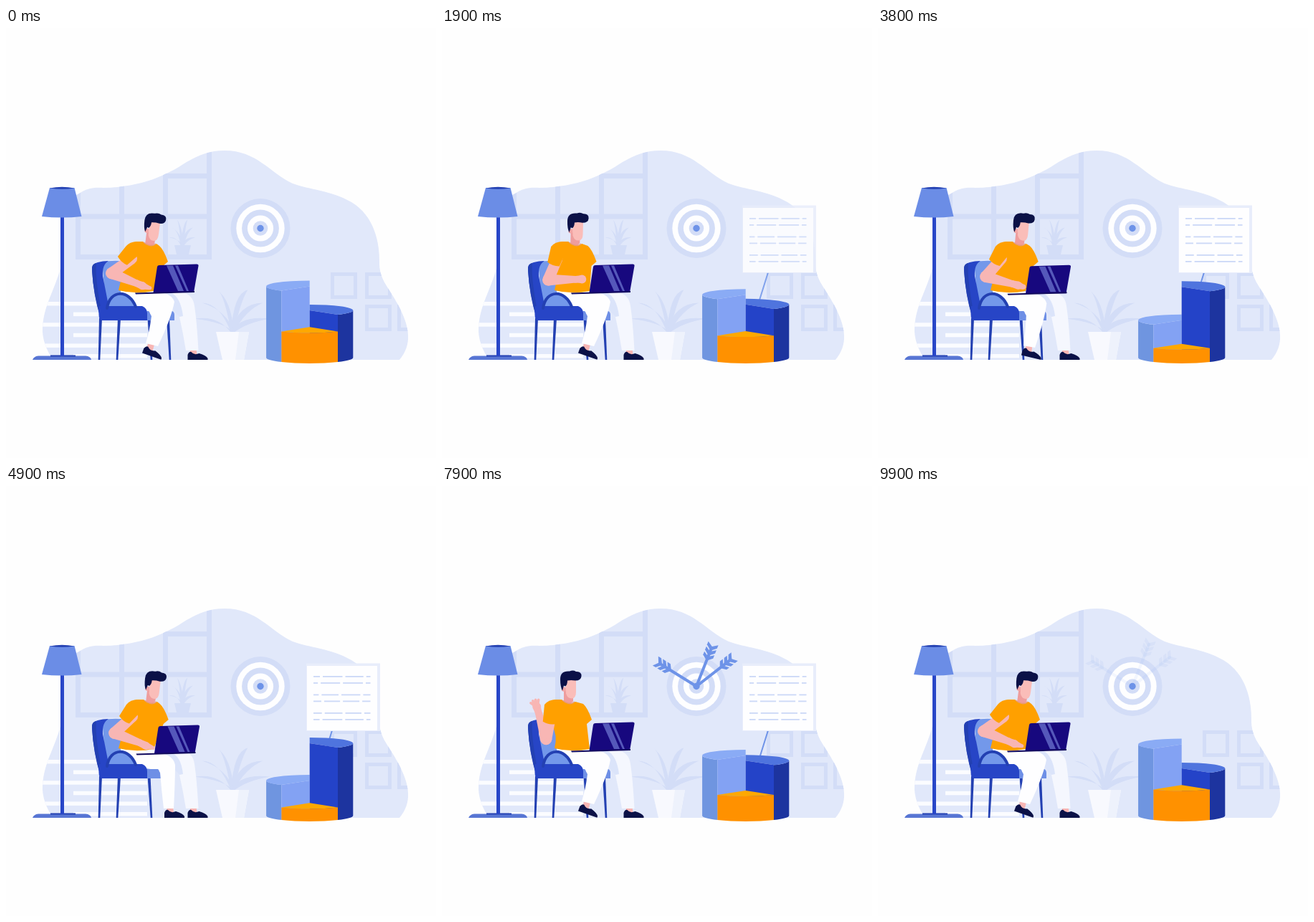
These frames come from a looping animation (600 px wide and 600 px high, 10000 ms). An HTML page with a canvas:

```html
<!DOCTYPE html>
<html lang="en">
<head>
<meta charset="utf-8">
<title>Working at home</title>
<style>
html, body { margin: 0; width: 100%; height: 100%; overflow: hidden; background: #fefefe; }
canvas { display: block; width: 600px; height: 600px; }
</style>
</head>
<body>
<canvas id="stage" width="600" height="600"></canvas>
<script>
const c = document.getElementById('stage').getContext('2d');
const LOOP = 10000;
const PALE = '#d3ddf7', SKY = '#6e93e8', BLUE = '#2745c6', DEEP = '#2340b2';
const NAVY = '#0b1147', SKIN = '#f8b6b4', ORANGE = '#ffa000', WHITE = '#fefeff';

const lerp = (a, b, u) => a + (b - a) * u;
const ramp = (t, a, b) => Math.min(1, Math.max(0, (t - a) / (b - a)));
const ease = (u, n = 2) => u < 0.5 ? Math.pow(2 * u, n) / 2 : 1 - Math.pow(2 - 2 * u, n) / 2;
const polar = ([x, y], deg, r) => [x + r * Math.cos(deg * Math.PI / 180), y + r * Math.sin(deg * Math.PI / 180)];

function shape(d, fill) {
  c.fillStyle = fill;
  c.fill(new Path2D(d));
}
function rect(x, y, w, h, fill) {
  c.fillStyle = fill;
  c.fillRect(x, y, w, h);
}
function disc(x, y, r, fill) {
  c.fillStyle = fill;
  c.beginPath();
  c.arc(x, y, r, 0, 7);
  c.fill();
}
function line(d, width, color, cap = 'butt') {
  c.lineWidth = width;
  c.strokeStyle = color;
  c.lineCap = cap;
  c.stroke(new Path2D(d));
}
function placed(x, y, turn, paint) {
  c.save();
  c.translate(x, y);
  c.rotate(turn);
  paint();
  c.restore();
}
// tapered bar with round ends
function limb([x1, y1], r1, [x2, y2], r2, fill) {
  const a = Math.atan2(y2 - y1, x2 - x1) + Math.PI / 2, s = Math.sin(a), k = Math.cos(a);
  disc(x1, y1, r1, fill);
  disc(x2, y2, r2, fill);
  c.beginPath();
  c.moveTo(x1 + r1 * k, y1 + r1 * s);
  c.lineTo(x2 + r2 * k, y2 + r2 * s);
  c.lineTo(x2 - r2 * k, y2 - r2 * s);
  c.lineTo(x1 - r1 * k, y1 - r1 * s);
  c.fill();
}

// ---- room ----
const blob = new Path2D('M66 463C56 450 50 432 51 418C52 398 58 384 66 364C76 340 82 318 81 290' +
  'C80 258 84 240 102 231C112 224 122 222 136 223C190 222 225 205 252 187C270 177 284 171 305 171' +
  'C350 171 368 202 400 217C424 226 452 226 482 243C514 262 522 300 521 330C522 352 534 362 547 386' +
  'C564 418 567 442 549 463Z');

function leaves(x, y, rx, ry, w) {
  for (const a of [0.4, 0.88, 1.27])
    for (const s of [-1, 1]) {
      const dx = s * rx * Math.sin(a), dy = -ry * Math.cos(a);
      const mx = x + dx * 0.3, my = y + dy * 0.75 - w;
      shape(`M${x - 2} ${y}Q${mx - w} ${my - w} ${x + dx} ${y + dy}Q${mx + w} ${my + w} ${x + 2} ${y}Z`, PALE);
    }
}

function frame(x, y) {
  c.strokeStyle = PALE;
  c.lineWidth = 5;
  c.strokeRect(x + 2.5, y + 2.5, 32, 32);
}

function room() {
  c.save();
  c.clip(blob);
  rect(0, 150, 600, 320, '#e1e8fa');
  for (let i = 0; i < 4; i++) rect(97 + 61 * i, i === 2 ? 203 : 165, 7, i === 2 ? 120 : 158, PALE);
  for (let i = 0; i < 3; i++) rect(i ? 97 : 219, 203 + 56.5 * i, i ? 190 : 68, 7, PALE);
  for (let i = 0; i < 6; i++) {
    const x = i % 2 ? 94 : 40;
    rect(x, 382 + i * 14.6, 197 - x, 5.5, '#fbfcff');
  }
  for (let i = 0; i < 2; i++) {
    frame(453 + 48 * i, 341);
    frame(501 + 45 * i, 386);
  }
  c.restore();

  shape('M235 303H258L255 316H238Z', PALE);
  leaves(246, 304, 19, 40, 2);

  for (let i = 0; i < 5; i++) disc(355, 279.5, 41.5 - 7.8 * i, i % 2 ? WHITE : PALE);
  disc(355, 279.5, 4.7, SKY);

  leaves(316, 425, 55, 65, 5);
  shape('M293 424H339L332 463H302Z', '#f8f9fe');
  shape('M325 424H339L332 463H320Z', '#eef2fc');
}

function lamp() {
  shape('M37 463Q39 458 45 457.5H111Q118 458 119 463Z', '#5876d4');
  rect(62, 456.5, 35, 2, DEEP);
  rect(76, 262, 5, 196, '#2846c8');
  shape('M61 223H95.5L105.5 263Q78 266 50 263Z', '#6b8de6');
  shape('M61 223.5Q78 220 95.5 223.5Q78 226 61 223.5Z', DEEP);
}

// ---- board and arrows ----
function board(alpha) {
  if (alpha <= 0) return;
  c.save();
  c.globalAlpha = alpha;
  line('M455 341L441 386', 2, SKY);
  rect(419, 247.5, 103, 94.5, '#e8edfb');
  rect(420, 251, 98, 90, WHITE);
  for (let i = 0; i < 6; i++) {
    const y = 265 + 25.5 * (i >> 1) + 9 * (i % 2);
    rect(429, y, 79.5, 1.8, '#cbd8f7');
    for (let k = 0; k < 3; k++) rect(438 + 29 * k + 3 * Math.sin(5 * i + k), y - 1, 4, 4, WHITE);
  }
  c.restore();
}

function arrow(dx, dy, shift, alpha) {
  if (alpha <= 0) return;
  const n = Math.hypot(dx, dy);
  c.save();
  c.globalAlpha = alpha;
  placed(355, 279.5, Math.atan2(dy, dx), () => {
    c.translate(shift, 0);
    line(`M0 0H${n - 8}`, 4, SKY, 'round');
    for (let i = 0; i < 3; i++)
      for (const s of [-1, 1]) {
        const d = n - 27 + 7.5 * i;
        shape(`M${d} 0L${d + 6} ${s * 7.5}H${d + 11}L${d + 6} 0Z`, SKY);
      }
  });
  c.restore();
}

function arrows(t) {
  const out = ramp(t, 8700, 10000);
  [[-58, -36], [24, -61], [54, -42]].forEach(([dx, dy], i) => {
    const u = ramp(t, 5600 + i * 270, 6050 + i * 270);
    arrow(dx, dy, 30 * (1 - u) * (1 - u) + 6 * out, u * (1 - out));
  });
}

// ---- pie blocks ----
const CX = 423.7, RX = 60.6, RY = 8, FLOOR = 460;
const FR = 0.865, FL = Math.PI - FR, BACK = Math.PI * 1.5;

function side(y, a, b, fill) {
  c.fillStyle = fill;
  c.beginPath();
  c.ellipse(CX, y, RX, RY, 0, a, b);
  c.ellipse(CX, FLOOR, RX, RY, 0, b, a, true);
  c.fill();
}
function lid(y, a, b, fill) {
  c.fillStyle = fill;
  c.beginPath();
  c.moveTo(CX, y);
  c.ellipse(CX, y, RX, RY, 0, a, b);
  c.fill();
}
function cut(y, a, fill) {
  const x = CX + RX * Math.cos(a), d = RY * Math.sin(a);
  shape(`M${CX} ${y}L${x} ${y + d}V${FLOOR + d}L${CX} ${FLOOR}Z`, fill);
}
function pie(t) {
  const p = ease(1 - Math.abs(t / 5000 - 1), 2.8);
  const left = lerp(360.5, 411, p), dark = lerp(394, 359, p), front = lerp(417.3, 442.3, p);
  side(left, FL, Math.PI, '#6f95e0');
  lid(left, FL, BACK, '#8aabf5');
  cut(left, FL, '#83a2f3');
  side(dark, 0, FR, '#1d349f');
  lid(dark, -Math.PI / 2, FR, '#4f74de');
  cut(dark, FR, '#2443c8');
  side(front, FR, FL, '#ff9100');
  lid(front, FR, FL, '#ffa800');
}

// ---- chair ----
function chairBack() {
  [[132, 130], [158, 155], [199.5, 203], [226, 229]].forEach(([a, b]) =>
    shape(`M${a - 2} 405H${a + 2}L${b + 1.3} 463H${b - 1.3}Z`, DEEP));
  shape('M190 394H229Q235 395 235 400V408H190Z', '#6e8fe6');
  shape('M134 327Q150 323 168 326L186 392H140Z', '#7398ea');
  shape('M120 338Q119 329 128 327Q135 325 143 325Q134 330 135 346L144 392L132 404Q122 372 120 338Z', BLUE);
  shape('M120 338Q119 329 126 328Q124 350 134 400L131 402Q122 372 120 338Z', DEEP);
}
function chairFront(p) {
  const edge = lerp(202, 215, p);
  shape('M141 391C145 364 172 365 181 389Z', '#7398ea');
  shape('M130 388H190Q197 391 197 398V408H133Q128 407 130 388Z', BLUE);
  shape(`M197 395H${edge - 3}Q${edge} 397 ${edge} 408H197Z`, '#6e8fe6');
  line('M141 391C145 364 172 365 181 389', 4, DEEP, 'round');
}

// ---- person ----
// time, neck x, head tilt, upper arm and forearm angles, open palm
const KEYS = [
  [0, 202, 0.13, 132, 22, 0], [1200, 202, 0.13, 127, 21, 0],
  [2200, 184, 0, 105, -6, 0], [3000, 184, 0, 105, -6, 0],
  [4200, 203, 0.12, 127, 21, 0], [5700, 203, 0.12, 127, 21, 0],
  [6600, 198, 0, 121, 22, 0], [6750, 198, 0, 121, 22, 0],
  [7600, 178, 0, 101, -106, 1], [8900, 178, 0, 101, -106, 1],
  [9800, 202, 0.13, 132, 22, 0], [LOOP, 202, 0.13, 132, 22, 0]
];

function poseAt(t) {
  const i = KEYS.findIndex(k => t < k[0]);
  const a = KEYS[i - 1], b = KEYS[i], u = ease(ramp(t, a[0], b[0]));
  const [, neck, tilt, upper, fore, open] = a.map((v, j) => lerp(v, b[j], u));
  const joint = [neck - 24, 308], elbow = polar(joint, upper, 46), cuff = polar(joint, upper, 23);
  return {
    neck, tilt, fore, open, joint, elbow,
    wrist: polar(elbow, fore, 38), hand: polar(elbow, fore, 47),
    outer: polar(cuff, upper + 90, 9), inner: polar(cuff, upper - 90, 8.5)
  };
}

function head({ neck, tilt }) {
  placed(neck, 302.5, tilt, () => {
    shape('M-8 -20L5 -10V-2Q0 4 -8 -1Z', '#ee9d9d');
    disc(-8, -19, 3.2, '#f2a5a5');
    shape('M-6 -32H9V-15Q9 -6 3 -6Q-3 -6 -5 -13Z', '#fabdb9');
    shape('M-13 -33Q-13 -45 0 -44Q5 -46 9 -43.5Q17 -44 16.5 -37Q16 -31 8 -31Q2 -32 -3 -31' +
      'Q-3 -25 -6 -23L-8 -24L-10 -17Q-13 -22 -13 -33Z', NAVY);
  });
}

function shoe(x, y, turn) {
  placed(x, y, turn, () => {
    shape('M3 -17H12L13 -6H4Z', SKIN);
    shape('M0 0V-7Q2 -12 5 -11Q9 -6 16 -9Q26 -6 28 -2V0Z', NAVY);
  });
}

function legs(p) {
  const m = (a, b) => lerp(a, b, p);
  shoe(253.5, 463, 0);
  shape('M195 368H240Q259 369 262.5 385Q266 405 268.5 450H251Q247 425 242 403Q236 385 220 384Z', '#f5f7fe');
  shape(`M215 ${m(369, 372)}H230Q244 376 247 402L242 403L226 385Z`, '#dbe4fa');
  shoe(m(190, 221), m(453.5, 463), m(0.34, 0));
  shape(`M160 364L205 ${m(367, 371)}Q${m(231, 233)} ${m(369, 373)} ${m(235, 236)} ${m(382, 389)}` +
    `Q${m(231, 236)} ${m(404, 412)} ${m(212, 234)} ${m(444, 450)}L${m(195, 220)} ${m(440, 450)}` +
    `Q${m(201, 217)} ${m(420, 425)} ${m(203, 215)} ${m(402, 400)}Q${m(200, 212)} 395 190 394H160Z`, WHITE);
}

function torso({ neck, inner: [ix, iy] }) {
  const far = lerp(197, 214, (neck - 178) / 24), cuff = far + 12;
  shape(`M${neck - 11} 298Q${neck} 308 ${neck + 8} 301L${far} 304Q${far + 6} 309 ${cuff} 326` +
    `L${cuff - 7} 332L206 367Q180 372 157 366Q162 348 ${ix - 5} ${iy}L${neck - 32} 306` +
    `Q${neck - 26} 298 ${neck - 18} 298Z`, ORANGE);
  line(`M${neck - 10} 299Q${neck} 307 ${neck + 7} 301`, 1.6, '#e79a74');
}

function arm(q, tap) {
  const { joint, elbow, wrist, fore, open, outer: [ox, oy], inner: [ix, iy] } = q;
  const [sx] = joint, hand = [q.hand[0], q.hand[1] + tap];
  limb(polar(joint, 100, 14), 7.5, elbow, 8, SKIN);
  limb(elbow, 8, wrist, 4.8, SKIN);
  limb(wrist, 4.8, hand, 5.5, SKIN);
  const flat = ramp(fore, 0, 21) * (1 - open);
  limb(hand, 5, [hand[0] + 10 * flat, hand[1] + 3 * flat], lerp(6, 2.5, flat), SKIN);
  for (let i = 0; i < 4; i++) limb(hand, 3, polar(hand, fore - 42 + 24 * i, 10 * open), 1.7, SKIN);
  shape(`M${sx + 8} 298Q${sx - 5} 297 ${sx - 11} 305L${ox} ${oy}Q${(ox + ix) / 2 - 1} ${(oy + iy) / 2 + 3} ` +
    `${ix} ${iy}L${sx + 8} 316Z`, ORANGE);
}

function laptop(p) {
  c.save();
  c.translate(1.5 * p, 4 * p);
  shape('M214 331L266 329.5Q269 329.5 268.5 332L262 369H205.5L211 333Q211.500 331 214 331Z', '#17087e');
  for (const [x, w] of [[224, 9], [236, 4]])
    shape(`M${x} 331.500H${x + w}L${x + w + 15} 367H${x + 16}Z`, '#5558ba');
  shape('M180 369.500L263 367V369L181 371.500Z', '#120b5e');
  c.restore();
}

function person(t) {
  const q = poseAt(t);
  const p = ease(ramp(t, 3400, 4400)) - ease(ramp(t, 6700, 7600));
  const typing = t < 1200 || (t > 4200 && t < 5600);
  chairBack();
  head(q);
  legs(p);
  torso(q);
  chairFront(p);
  arm(q, typing ? Math.sin(t * Math.PI / 200) * 0.8 : 0);
  laptop(p);
}

function draw(t) {
  rect(0, 0, 600, 600, '#fefefe');
  room();
  lamp();
  arrows(t);
  board(ease(ramp(t, 1250, 2150)) - ease(ramp(t, 8700, 9750)));
  pie(t);
  person(t);
}

const start = performance.now();
function tick() {
  draw(Math.max(0, performance.now() - start) % LOOP);
  requestAnimationFrame(tick);
}
tick();
</script>
</body>
</html>
```
